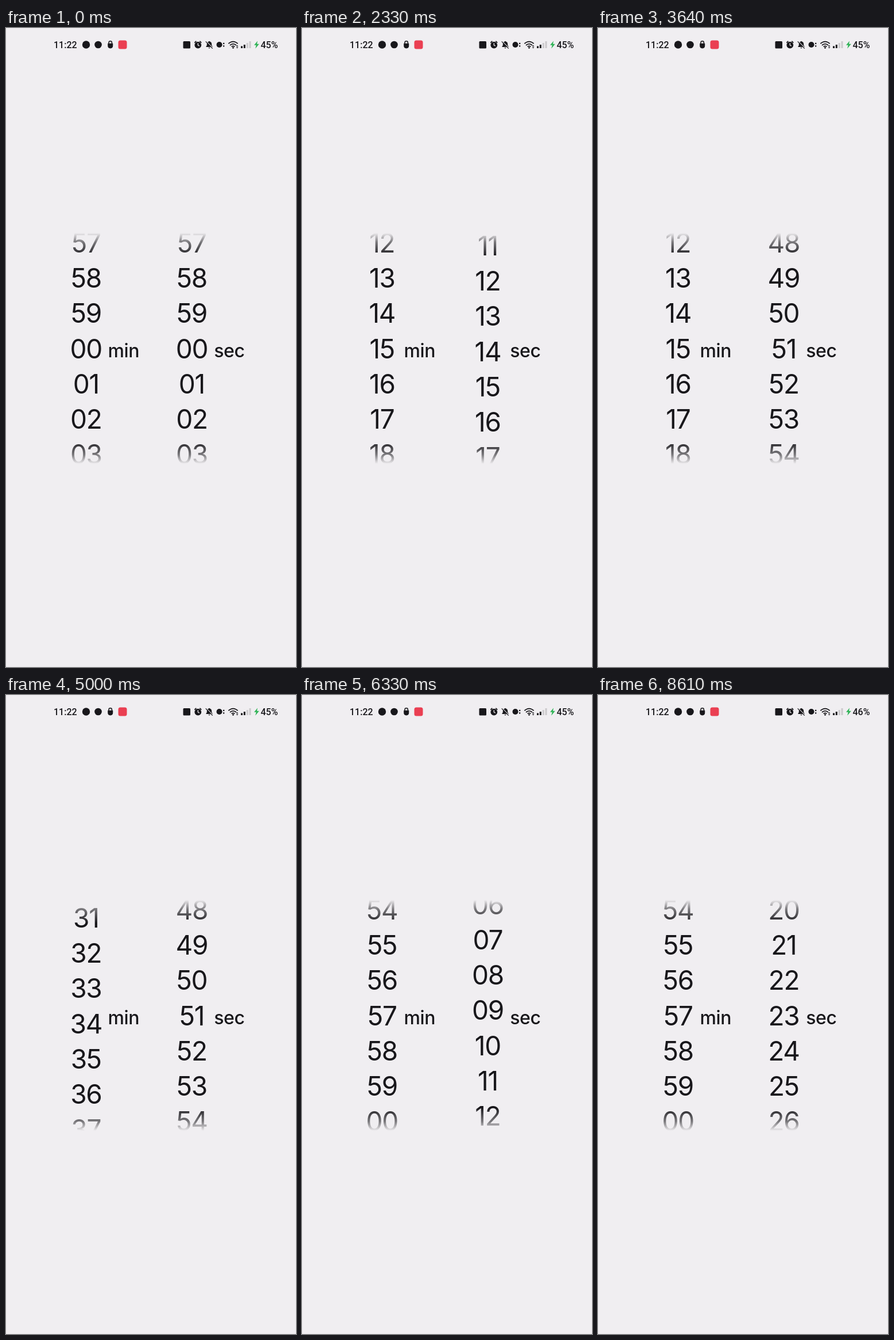
These frames come from a looping animation (505 px wide and 1110 px high, 8700 ms). An HTML page:

```html
<!DOCTYPE html>
<html lang="en">
<head>
<meta charset="utf-8">
<title>Time picker</title>
<style>
  html, body { margin: 0; width: 100%; height: 100%; overflow: hidden; background: #f0eef1; }
  svg { display: block; width: 100%; height: 100%; }
  .wheel text { font: 400 46px Inter, sans-serif; letter-spacing: -1.3px; text-anchor: middle; }
  .unit { font: 500 32px Inter, sans-serif; letter-spacing: -.4px; }
  .bar text { font: 500 16px Roboto, sans-serif; }
</style>
</head>
<body>
<svg viewBox="0 0 505 1110" fill="#18171b">
  <defs>
    <linearGradient id="fade" gradientUnits="userSpaceOnUse" x1="0" y1="356" x2="0" y2="757">
      <stop offset="0" stop-color="#fff" stop-opacity="0"/>
      <stop offset=".04" stop-color="#fff" stop-opacity=".55"/>
      <stop offset=".1" stop-color="#fff"/>
      <stop offset=".9" stop-color="#fff"/>
      <stop offset=".96" stop-color="#fff" stop-opacity=".55"/>
      <stop offset="1" stop-color="#fff" stop-opacity="0"/>
    </linearGradient>
    <mask id="window" maskUnits="userSpaceOnUse" x="0" y="356" width="505" height="401">
      <rect x="0" y="356" width="505" height="401" fill="url(#fade)"/>
    </mask>
  </defs>

  <g class="bar">
    <text x="83" y="35">11:22</text>
    <circle cx="139.5" cy="29" r="6.7"/>
    <circle cx="160.5" cy="29" r="6.3"/>
    <!-- padlock -->
    <path d="M179 28v-2.5a2.7 2.7 0 0 1 5.4 0v2.5" fill="none" stroke="#18171b" stroke-width="1.5"/>
    <path d="M177.2 26.800h9v4.200q0 4-4.500 4.500q-4.500-.5-4.500-4.500z"/>
    <rect x="195.500" y="21.500" width="15" height="15" rx="3.500" fill="#ea3f52"/>

    <rect x="308.500" y="23" width="12.500" height="12.500" rx="1.500"/>
    <!-- alarm -->
    <circle cx="334.300" cy="29.600" r="5.900"/>
    <path d="M328.300 25.600l3-2.700M340.300 25.600l-3-2.700" stroke="#18171b" stroke-width="1.800"/>
    <path d="M334.300 26.200v3.600l2.500 1.500" fill="none" stroke="#f0eef1" stroke-width="1.300"/>
    <!-- muted bell -->
    <path d="M348.500 33v-1.200l1.300-1.500v-3q.4-3.100 3.100-3.700q1.100-1.700 2.200 0q2.700.6 3.100 3.700v3l1.300 1.500V33zM352.400 34h3.200q-1.600 2.800-3.200 0z"/>
    <path d="M348.600 22.800l12 12.200" stroke="#f0eef1" stroke-width="1.200"/>
    <path d="M347.700 23.400l12 12.200" stroke="#18171b" stroke-width="1.300"/>
    <circle cx="371.500" cy="29" r="5"/>
    <path d="M378 25.800h2.300v2.200h-2.300zM378 30.200h2.300v2.200h-2.300z"/>
    <!-- wireless -->
    <g fill="none" stroke="#18171b" stroke-width="1.700">
      <path d="M387.300 27.200q8.200-7.200 16.400 0"/>
      <path d="M390 30q5.500-4.800 11 0"/>
      <path d="M392.700 32.600q2.800-2.300 5.600 0"/>
    </g>
    <circle cx="395.500" cy="34.400" r="1.400"/>
    <path d="M400.800 32l1.800-2.200l1.800 2.200zM400.800 33.300h3.600l-1.800 2.200z"/>
    <!-- signal -->
    <path d="M409 31.500h3v3.500h-3zM413.800 29h3v6h-3z"/>
    <path d="M418.700 26h3v9h-3zM423.500 23h3v12h-3z" fill="#cbc9cc"/>
    <path d="M438 22.500l-6 7.300h3.600l-1.400 5.900l6.600-7.900h-3.800z" fill="#2fb457"/>
    <text id="charge" x="443.500" y="35">45%</text>
  </g>

  <g mask="url(#window)">
    <g class="wheel" id="min"></g>
    <g class="wheel" id="sec"></g>
  </g>
  <text class="unit" x="177.600" y="571.700">min</text>
  <text class="unit" x="362.200" y="571.700">sec</text>
</svg>
<script>
const LOOP = 8700, STEP = 30, PITCH = 61.25, BASE = 573.6, ROWS = 9;

// Flicks: start ms, from, duration ms, to, deceleration power
const wheels = [
  { id: 'min', x: 139.3, flicks: [
    [970, 0, 330, 15, 1.948],
    [4850, 15, 630, 57, 2.178]
  ] },
  { id: 'sec', x: 323.4, flicks: [
    [1730, 0, 450, 13, 2.1],
    [2300, 13, 30, 13.92, 1],
    [2330, 13.92, 400, 30, 2.2],
    [2850, 30, 730, 51, 2.81],
    [6150, 51, 610, 83, 2.395]
  ] }
];

for (const w of wheels) {
  const group = document.getElementById(w.id);
  w.rows = Array.from({ length: ROWS }, () => {
    const row = document.createElementNS('http://www.w3.org/2000/svg', 'text');
    row.setAttribute('x', w.x);
    return group.appendChild(row);
  });
}

// The wheels advance in held steps, counted from each flick's start
function valueAt(flicks, t) {
  let value = 0;
  for (const [t0, from, duration, to, power] of flicks) {
    if (t < t0) break;
    const elapsed = Math.floor((t - t0) / STEP) * STEP;
    const u = Math.min(1, elapsed / duration);
    value = from + (to - from) * (1 - (1 - u) ** power);
  }
  return value;
}

function drawWheel(w, t) {
  const value = valueAt(w.flicks, t);
  const first = Math.round(value) - (ROWS - 1) / 2;
  w.rows.forEach((row, i) => {
    const n = first + i;
    row.textContent = String((n + 60) % 60).padStart(2, '0');
    row.setAttribute('y', (BASE + (n - value) * PITCH).toFixed(2));
  });
}

const charge = document.getElementById('charge');
const start = performance.now();

function draw(now) {
  const t = Math.max(0, now - start) % LOOP;
  for (const w of wheels) drawWheel(w, t);
  charge.textContent = t < 7480 ? '45%' : '46%';
  requestAnimationFrame(draw);
}
draw(start);
</script>
</body>
</html>
```
